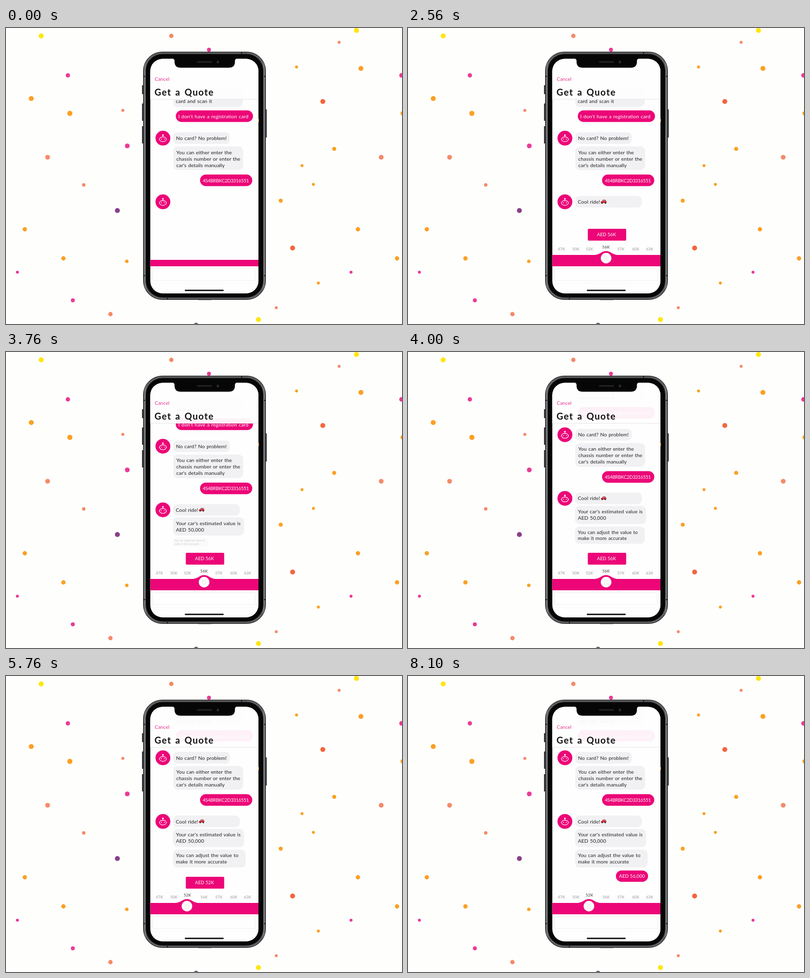
Write an HTML page that moves like this. It is 800 px wide and 600 px high and loops after 8400 ms.

```html
<!DOCTYPE html>
<html lang="en">
<head>
<meta charset="utf-8">
<title>Get a Quote</title>
<style>
html, body { margin: 0; width: 100%; height: 100%; overflow: hidden; background: #fefefd; }
svg { display: block; width: 800px; height: 600px; }
text { font: 10.3px Lato, "Open Sans", sans-serif; fill: #222; letter-spacing: .06px; word-spacing: .7px; }
.bubble { fill: #f1f1f4; }
.pink { fill: #ec0677; }
.light { fill: #fff; }
.mid { text-anchor: middle; }
.title { font-size: 18.5px; font-weight: 700; letter-spacing: 1.4px; word-spacing: 2px; fill: #111; }
.cancel { font-size: 9.9px; fill: #ec2f8f; }
.chassis { font-size: 9.5px; letter-spacing: -.3px; }
.price { font-size: 9.4px; letter-spacing: 0; word-spacing: 0; fill: #fff; text-anchor: middle; }
.tick { font-size: 8px; letter-spacing: 0; text-anchor: middle; }
</style>
</head>
<body>
<svg viewBox="0 0 800 600">
  <defs>
    <clipPath id="screen"><rect x="291.5" y="62.5" width="218.5" height="475.5" rx="25"/></clipPath>
    <linearGradient id="rim">
      <stop offset="0" stop-color="#3b3c3e"/><stop offset=".012" stop-color="#87888a"/>
      <stop offset=".03" stop-color="#4c4d4f"/><stop offset=".97" stop-color="#4c4d4f"/>
      <stop offset=".988" stop-color="#87888a"/><stop offset="1" stop-color="#3b3c3e"/>
    </linearGradient>
    <g id="robot">
      <circle class="pink" r="15"/>
      <g fill="none" stroke="#fff" stroke-width="1.2" stroke-linecap="round">
        <path d="M0 -5V-2.5M-6.3 .2C-4 -3.4 4 -3.4 6.3 .2M-6.3 4.2C-4 8 4 8 6.3 4.2M-3.7 1.8h1.4M2.3 1.8h1.4"/>
      </g>
      <circle class="light" cy="-6.2" r="1.6"/>
      <circle class="light" cx="-7" cy="2.2" r="1.1"/>
      <circle class="light" cx="7" cy="2.2" r="1.1"/>
    </g>
  </defs>

  <g id="confetti"></g>

  <!-- phone body -->
  <path d="M276 116v18M276 153v35M276 199v35M525.5 165v57" stroke="#2b2c2e" stroke-width="2.4"/>
  <path d="M388 551h27" stroke="#77787a" stroke-width="1.2"/>
  <rect x="277.5" y="48.5" width="247" height="502" rx="38" fill="url(#rim)" stroke="#202123"/>
  <rect x="280" y="51" width="242" height="497" rx="36" fill="none" stroke="#737476" stroke-width="1.2"/>
  <rect x="282.5" y="53" width="237" height="493" rx="34" fill="#060606" stroke="#1c1c1d"/>
  <path d="M277 98h4M277 502h4M521 98h4M521 502h4M476 48.500v4M326 547v4" stroke="#1b1b1c" stroke-width="2"/>
  <rect x="291.5" y="62.5" width="218.500" height="475.5" rx="25" fill="#fefefe"/>

  <g clip-path="url(#screen)">
    <g id="chat">
      <path class="bubble" d="M338 120H478V149Q478 160 467 160H346Q338 160 338 153Z"/>
      <text x="343" y="152">card and scan it</text>
      <rect class="pink" x="343" y="167" width="156" height="23.5" rx="11.7"/>
      <text class="light" x="348" y="183">I don't have a registration card</text>
      <use href="#robot" x="317" y="223.300"/>
      <rect class="bubble" x="338" y="211.500" width="114" height="23.5" rx="8"/>
      <text x="343.5" y="227">No card? No problem!</text>
      <rect class="bubble" x="338" y="240" width="141" height="48" rx="9"/>
      <text x="344" y="255.800">You can either enter the</text>
      <text x="344" y="268.800">chassis number or enter the</text>
      <text x="344" y="281.800">car's details manually</text>
      <rect class="pink" x="392" y="297" width="105.500" height="23.5" rx="11.7"/>
      <text class="light chassis" x="397.5" y="312.800">4S4BRBKC2D3316551</text>
      <use href="#robot" x="317" y="352.300"/>
      <g id="reply">
        <rect id="replyBox" x="337.500" y="340.500" height="23.5" rx="9"/>
        <g id="dots" fill="#a9abb3">
          <circle cx="349.7" cy="352.300" r="3.6"/><circle cx="357.2" cy="352.300" r="3.6"/><circle cx="364.7" cy="352.300" r="3.6"/>
        </g>
      </g>
      <text id="cool" x="343" y="356">Cool ride!</text>
      <g id="car">
        <path d="M-5.5 2.800V.2L-3.300 -.6L-1.400 -3.400H3.200L5.300 -.4V2.800Z" fill="#dc2a35"/>
        <path d="M-2.300 -.7L-.9 -2.600H.6V-.7ZM1.300 -.7V-2.600H2.800L4 -.7Z" fill="#7f9aa8"/>
        <circle cx="-3" cy="2.700" r="1.500" fill="#333"/><circle cx="3.200" cy="2.700" r="1.500" fill="#333"/>
      </g>
      <g id="value">
        <rect class="bubble" width="143.500" height="37" rx="9"/>
        <text x="5.800" y="15.700">Your car's estimated value is</text>
        <text x="5.800" y="28.600">AED 50,000</text>
      </g>
      <g id="adjust">
        <rect class="bubble" width="146.500" height="36.500" rx="9"/>
        <text x="5.800" y="15.700">You can adjust the value to</text>
        <text x="5.800" y="28.600">make it more accurate</text>
      </g>
    </g>

    <rect x="291" y="62" width="220" height="82" fill="#fefefe" opacity=".95"/>
    <path d="M291 144.500H511" stroke="#e6e6e8"/>
    <text class="cancel" x="300.500" y="107">Cancel</text>
    <text class="title" x="300" y="137">Get a Quote</text>

    <rect x="296.500" y="488" width="207" height="24" rx="1.500" fill="#fefefe" stroke="#f0f0f1"/>
    <path d="M292 517.500H510" stroke="#f8f8f8"/>
    <path id="bar" class="pink"/>
    <g id="ticks"></g>
    <g id="knob">
      <circle class="light" r="10.700"/>
      <path d="M-3.500 -5.500V5.500M0 -5.500V5.500M3.500 -5.500V5.500" stroke="#dedee2"/>
    </g>
    <g id="button">
      <rect id="pill" class="pink"/>
      <text class="price">AED 56K</text>
      <text class="price">AED 52K</text>
      <text class="price" style="font-size:9.7px">AED 56,000</text>
    </g>
  </g>

  <path d="M335 61.500Q340 62 340.500 66V69Q341 80.500 353 80.500H450Q462 80.500 462.500 69V66Q463 62 468 61.500Z" fill="#060606"/>
  <rect x="385.500" y="67" width="31" height="3.600" rx="1.800" fill="#202022"/>
  <circle cx="428" cy="69" r="3" fill="#1c1f29"/><circle cx="428" cy="69" r="1.200" fill="#343a50"/>
  <path d="M362.500 531.800H438.500" stroke="#080808" stroke-width="2.800" stroke-linecap="round"/>
  <path d="M510.500 184.500v6" stroke="#d98418" stroke-width="1.200"/>
</svg>
<script>
const LOOP = 8400;
const $ = id => document.getElementById(id);
const make = (parent, tag, attrs) => {
  const el = parent.appendChild(document.createElementNS("http://www.w3.org/2000/svg", tag));
  set(el, attrs);
  return el;
};
function set(el, attrs) {
  for (const key in attrs) el.setAttribute(key, attrs[key]);
}
const clamp = v => Math.min(1, Math.max(0, v));
const span = (t, a, b) => clamp((t - a) / (b - a));
const mix = (a, b, k) => a + (b - a) * k;
const out = (k, power = 3) => 1 - (1 - k) ** power;
const inOut = k => k < .5 ? 4 * k ** 3 : 1 - (2 - 2 * k) ** 3 / 2;
const back = (k, s = 1.7) => 1 + (s + 1) * (k - 1) ** 3 + s * (k - 1) ** 2;

// x, y, radius of each dot by colour
const confetti = {
  "#ffe607": [71,16,5, 708,5,5, 510,591,5],
  "#fba022": [51,143,5, 129,173,5.2, 717,82,5, 663,245,4, 587,79,3, 598,279,3, 621,317,3, 555,350,4,
    711,408,4.4, 790,467,4.4, 631,517,3, 38,408,4.4, 116,467,4.4, 244,473,3.5, 802,173,5],
  "#f48a68": [334,16,4.4, 673,29,3, 236,167,3, 84,262,4.8, 157,318,3.5, 758,262,4.8, 211,580,4.4, 546,567,3],
  "#f2673d": [640,149,5, 579,446,5],
  "#ea3a95": [125,96,4.4, 410,44,4, 245,239,4.8, 23,495,3, 135,552,4, 697,495,3, 799,96,4.6],
  "#8a3f88": [225,370,5],
  "#5c5c60": [384,602.5,5]
};
for (const [fill, list] of Object.entries(confetti))
  for (let i = 0; i < list.length; i += 3)
    make($("confetti"), "circle", { cx: list[i], cy: list[i + 1], r: list[i + 2], fill });

const tickX = [310, 339, 366.5, 400, 430, 460, 488];
const ticks = ["47K", "50K", "52K", "56K", "57K", "60K", "63K"].map((label, i) => {
  const el = make($("ticks"), "text", { class: "tick", x: tickX[i] });
  el.textContent = label;
  return el;
});
const prices = $("button").querySelectorAll("text");

function drawChat(t) {
  const scroll = 31.3 * out(span(t, 3090, 3690), 4) + 26.2 * out(span(t, 3756, 4356), 5);
  set($("chat"), { transform: `translate(0 ${-scroll})` });

  const shown = out(span(t, 480, 690));
  const wide = inOut(span(t, 1330, 1720));
  set($("reply"), { opacity: shown, transform: `translate(337.5 352.3) scale(${shown}) translate(-337.5 -352.3)` });
  set($("replyBox"), { width: mix(39.5, 135, wide), fill: wide > .5 ? "#f1f1f4" : "#eaecef" });
  set($("dots"), { opacity: 1 - span(t, 1300, 1450) });
  [...$("dots").children].forEach((dot, i) =>
    set(dot, { opacity: .7 + .3 * Math.cos(2 * Math.PI * ((t - 730) / 800 - (i - .5) / 3)) }));
  set($("cool"), { opacity: span(t, 1750, 2150) });
  const car = t < 2150 ? 0 : back(span(t, 2150, 2760));
  set($("car"), { transform: `translate(395.3 351.7) scale(${car})` });

  const pop = (id, y, size, opacity) =>
    set($(id), { transform: `translate(337.5 ${y}) scale(${size})`, opacity });
  pop("value", 367.3, mix(.45, 1, out(span(t, 3090, 3600), 4)), span(t, 3080, 3400));
  pop("adjust", 409.3, mix(.46, 1, out(span(t, 3756, 4356), 5)), span(t, 3700, 3960));
}

function drawSlider(t) {
  const x = mix(400.2, 365.5, inOut(span(t, 4800, 5770)));
  const top = mix(470, 460, out(span(t, 30, 450)));
  const peak = top - 7.8 * out(span(t, 250, 680));
  set($("bar"), {
    d: `M291 ${top}H${x - 25}C${x - 12} ${top} ${x - 10} ${peak} ${x} ${peak}
      S${x + 12} ${top} ${x + 25} ${top}H511V483H291Z`
  });
  set($("ticks"), { opacity: span(t, 200, 620) });
  ticks.forEach((el, i) => {
    const near = clamp(1.1 - Math.abs(tickX[i] - x) / 18);
    const grey = mix(153, 105, near);
    set(el, { y: 451 - 4.4 * near });
    el.style.fill = `rgb(${grey},${grey},${grey})`;
    el.style.fontWeight = near > .5 ? 700 : 400;
  });
  const size = out(span(t, 700, 1050), 2);
  set($("knob"), { transform: `translate(${x} 466.5) scale(${size})` });
}

function drawButton(t) {
  const pop = t < 400 ? 0 : back(span(t, 400, 812));
  const k = t < 6760 ? 0 : back(span(t, 6760, 7480), 2.2);
  const dip = 9 * Math.sin(Math.PI * span(t, 6630, 6960));
  const w = mix(77.5, 65, k), h = mix(24, 23, k);
  const cx = mix(402, 452.5, k), cy = mix(419, 405.7, k) + dip;
  set($("button"), { transform: `translate(${cx} ${cy}) scale(${pop})` });
  set($("pill"), { x: -w / 2, y: -h / 2, width: w, height: h, rx: mix(2, 11.5, clamp(k)) });
  const changed = span(t, 5180, 5360), sent = span(t, 6800, 7000);
  [1 - changed, changed * (1 - sent), sent].forEach((opacity, i) =>
    set(prices[i], { opacity, x: i < 2 ? -1 : 0, y: 3.3 }));
}

function frame(now) {
  const t = now % LOOP;
  drawChat(t);
  drawSlider(t);
  drawButton(t);
  requestAnimationFrame(frame);
}
frame(0);
</script>
</body>
</html>
```
